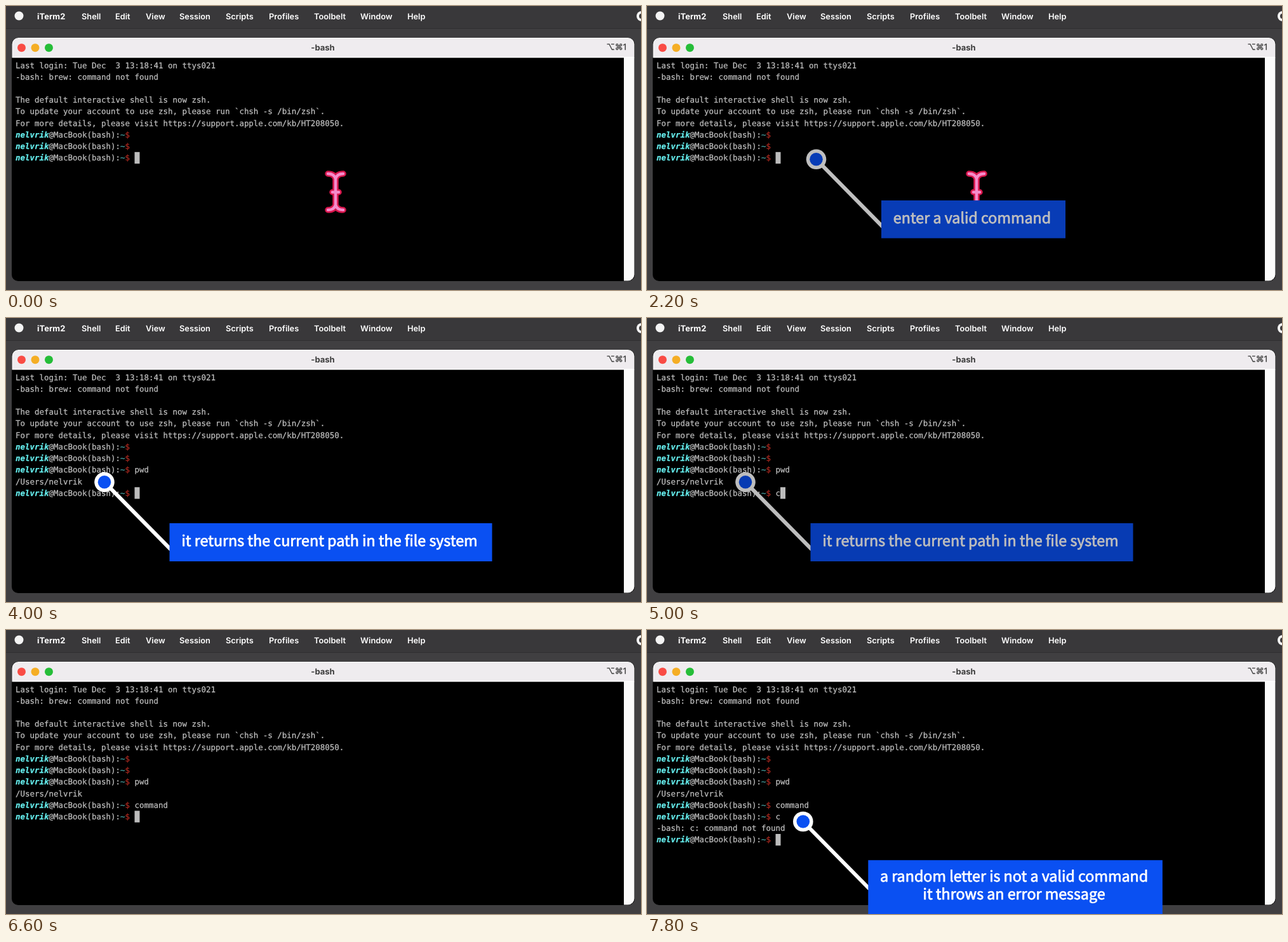
These frames come from a looping animation (1000 by 447 pixels, 8 s). An HTML page with a canvas:

```html
<!DOCTYPE html>
<html lang="en">
<head>
<meta charset="utf-8">
<title>Shell prompt</title>
<style>
html, body { margin: 0; width: 100%; height: 100%; overflow: hidden; background: #3c3b3d; }
canvas { display: block; }
</style>
</head>
<body>
<canvas id="stage" width="1000" height="447"></canvas>
<script>
const ctx = document.getElementById('stage').getContext('2d');
const LOOP = 8000, STEP = 200;
const UI = 'Inter, sans-serif';
const MONO = '"DejaVu Sans Mono", monospace';
const LABEL = '23.25px "Noto Sans CJK JP", "Noto Sans", sans-serif';
const LEFT = 15, CELL = 7.5, ROW = 18.23, TOP = 97.5;
const GREY = '#bebebe', USER = 'nelvrik';

const MENU = [['Shell', 119], ['Edit', 172], ['View', 220], ['Session', 273], ['Scripts', 346],
  ['Profiles', 414], ['Toolbelt', 485], ['Window', 558], ['Help', 632]];

const INTRO = [
  'Last login: Tue Dec  3 13:18:41 on ttys021',
  '-bash: brew: command not found',
  '',
  'The default interactive shell is now zsh.',
  'To update your account to use zsh, please run `chsh -s /bin/zsh`.',
  'For more details, please visit https://support.apple.com/kb/HT208050.'
];

// Each command is typed one letter per step from `start`, then entered at `run`.
const COMMANDS = [
  { text: 'pwd', start: 2400, run: 3400, output: '/Users/' + USER },
  { text: 'command', start: 5000, run: 6400 },
  { text: 'c', start: 6800, run: 7000, output: '-bash: c: command not found' }
];

const CALLOUTS = [
  { x: 144.5, y: 282, w: 133, h: 59.5, lines: ['PROMPT'], from: 200, to: 1180 },
  { x: 266.5, y: 241.3, w: 290, h: 59.5, lines: ['enter a valid command'], from: 1900, to: 2780 },
  { x: 155, y: 258.3, w: 508, h: 60, lines: ['it returns the current path in the file system'], from: 3500, to: 4870 },
  { x: 245.8, y: 301.5, w: 463.5, h: 90, lines: ['a random letter is not a valid command', 'it throws an error message'], from: 7000, to: LOOP, dy: -4 }
];

// `bold` is the width of an outline that thickens the strokes a little.
function text(str, x, y, font, color, align = 'left', bold = 0) {
  ctx.font = font;
  ctx.fillStyle = ctx.strokeStyle = color;
  ctx.textAlign = align;
  ctx.fillText(str, x, y);
  if (!bold) return;
  ctx.lineWidth = bold;
  ctx.lineJoin = 'round';
  ctx.strokeText(str, x, y);
}

function rect(x, y, w, h, color, radius = 0) {
  ctx.fillStyle = color;
  ctx.beginPath();
  ctx.roundRect(x, y, w, h, radius);
  ctx.fill();
}

function dot(x, y, r, color) {
  ctx.fillStyle = color;
  ctx.beginPath();
  ctx.arc(x, y, r, 0, 7);
  ctx.fill();
}

function drawDesktop() {
  rect(0, 0, 1000, 447, '#403f41');
  rect(0, 0, 1000, 35, '#39383a');
  rect(0, 35, 1000, 1, '#302f31');
  dot(20.5, 15.5, 7, '#f4f4f4');
  text('iTerm2', 49, 20.5, '700 13px ' + UI, '#fff');
  for (const [name, x] of MENU) text(name, x, 20.5, '600 12.8px ' + UI, '#fff');
  dot(1001, 16, 8, '#f4f4f4');
  dot(1001, 16, 4, '#39383a');
}

function drawWindow() {
  rect(9, 50, 981, 383, '#000', 10);
  rect(9.5, 50, 980, 31.5, '#fff', [10, 10, 0, 0]);
  rect(10.5, 51, 978, 29, '#efecef', [9, 9, 0, 0]);
  rect(973, 81, 16.5, 351.5, '#fbfbfb', [0, 0, 10, 0]);
  dot(24.5, 65.7, 6.5, '#f94c45');
  dot(46, 65.7, 6.5, '#f5ae25');
  dot(67.5, 65.7, 6.5, '#25bd38');
  text('-bash', 499, 70, '700 13px ' + UI, '#3c3c3c', 'center');
  text('⌥⌘1', 977, 69, '13px Inter, "DejaVu Sans", sans-serif', '#3c3c3c', 'right', 0.3);
}

const rowY = row => TOP + row * ROW;

function mono(str, col, row, color = GREY, style = '') {
  text(str, LEFT + col * CELL, rowY(row), style + ' 12.46px ' + MONO, color, 'left', 0.25);
}

function drawPrompt(row, command) {
  mono(USER, 0, row, '#66eeee', 'italic bold');
  mono('@MacBook(bash):', 7, row);
  mono('~', 22, row, '#459f9f');
  mono('$', 23, row, '#ad2a20');
  mono(command, 25, row);
}

function drawTerminal(t) {
  INTRO.forEach((line, row) => mono(line, 0, row));
  let row = INTRO.length, typed = '';
  drawPrompt(row++, '');
  drawPrompt(row++, '');
  for (const cmd of COMMANDS) {
    typed = cmd.text.slice(0, Math.max(0, Math.floor((t - cmd.start) / STEP) + 1));
    if (t < cmd.run) break;
    drawPrompt(row++, typed);
    if (cmd.output) mono(cmd.output, 0, row++);
    typed = '';
  }
  drawPrompt(row, typed);
  rect(LEFT + (25 + typed.length) * CELL, rowY(row) - 13.5, 8, 18.3, '#bcbcbc');
}

function drawPointer() {
  const beam = new Path2D('M507 264 Q517 264 519 272 Q521 264 531 264 M519 272 V313 ' +
    'M507 321 Q517 321 519 313 Q521 321 531 321 M514 293 H524');
  ctx.lineCap = ctx.lineJoin = 'round';
  for (const [width, color] of [[9.5, '#d9164c'], [4.5, '#f58bcb']]) {
    ctx.lineWidth = width;
    ctx.strokeStyle = color;
    ctx.stroke(beam);
  }
}

function drawCallout(c, t) {
  const alpha = Math.min((t - c.from) / 400, 1 - (t - c.to) / 500, 1);
  if (alpha <= 0) return;
  const left = c.x + 102.5, top = c.y + 64.7 + (c.dy || 0);
  // Dimming colours keeps overlapping parts even over the black window.
  const shade = (r, g, b) => `rgb(${r * alpha},${g * alpha},${b * alpha})`;
  const white = shade(255, 255, 255), blue = shade(10, 80, 242);
  ctx.strokeStyle = white;
  ctx.lineWidth = 6;
  ctx.lineCap = 'butt';
  ctx.beginPath();
  ctx.moveTo(c.x, c.y);
  ctx.lineTo(left + 2, c.y + 106);
  ctx.stroke();
  dot(c.x, c.y, 15.8, white);
  dot(c.x, c.y, 10.3, blue);
  rect(left, top, c.w, c.h, blue);
  c.lines.forEach((line, i) =>
    text(line, left + c.w / 2 - 2, top + 35.8 + (c.dy ? -2.5 : 0) + i * 28.5, LABEL, white, 'center', 0.8));
}

function draw(now) {
  const t = Math.floor(now % LOOP / STEP) * STEP;
  ctx.textRendering = 'geometricPrecision';
  drawDesktop();
  drawWindow();
  drawTerminal(t);
  if (t < COMMANDS[0].start) drawPointer();
  for (const c of CALLOUTS) drawCallout(c, t);
}

let start;
function frame(now) {
  start ??= now;
  draw(now - start);
  requestAnimationFrame(frame);
}
requestAnimationFrame(frame);
</script>
</body>
</html>
```
